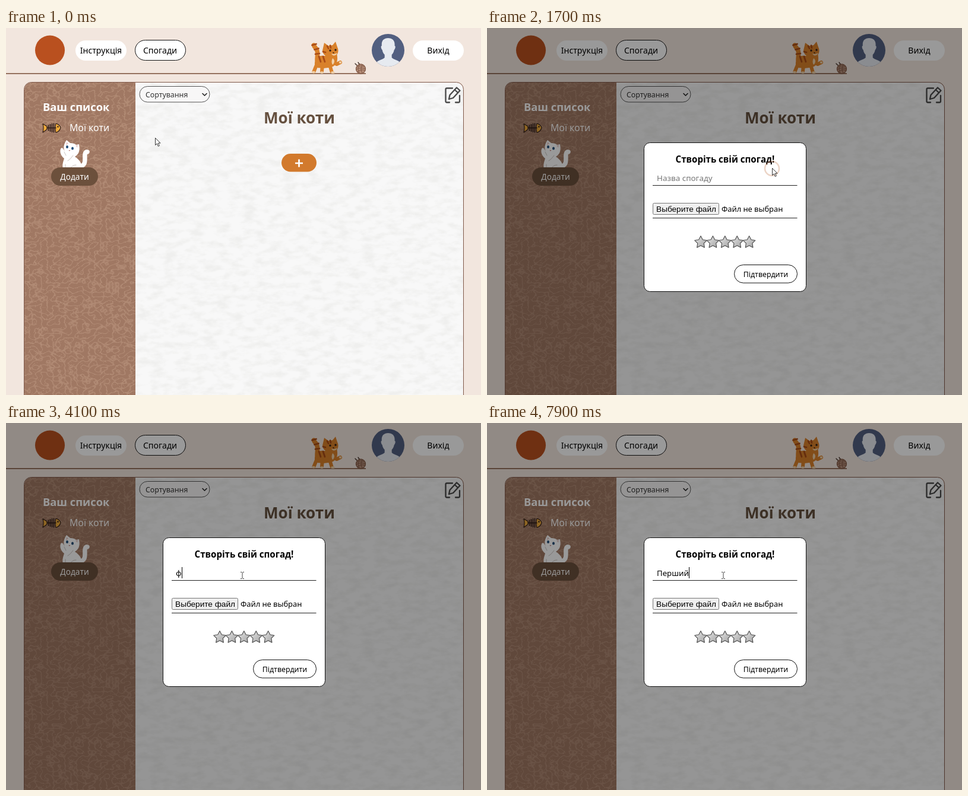
These frames come from a looping animation (800x619 px, 8000 ms). An HTML page:

```html
<!DOCTYPE html>
<html lang="uk">
<head>
<meta charset="utf-8">
<title>Мої коти</title>
<style>
html, body { margin: 0; width: 100%; height: 100%; overflow: hidden; background: #f2e6de; }
svg { position: absolute; left: 0; top: 0; width: 800px; height: 619px; }
#live { will-change: transform; }
text { font-family: "Noto Sans", "Open Sans", sans-serif; fill: #000; }
.mid { text-anchor: middle; }
.bold { font-weight: 700; }
.line { fill: none; stroke-linecap: round; stroke-linejoin: round; }
</style>
</head>
<body>
<svg id="scene" viewBox="0 0 800 619">
  <defs>
    <filter id="leather" x="0" y="0" width="1" height="1" color-interpolation-filters="sRGB">
      <feTurbulence type="turbulence" baseFrequency=".1 .13" numOctaves="1" seed="4"/>
      <feColorMatrix values="0 0 0 0 .8  0 0 0 0 .66  0 0 0 0 .57  -6 0 0 0 .8"/>
    </filter>
    <filter id="paper" x="0" y="0" width="1" height="1" color-interpolation-filters="sRGB">
      <feTurbulence type="fractalNoise" baseFrequency=".045 .1" numOctaves="3" seed="9"/>
      <feColorMatrix values="0 0 0 0 .91  0 0 0 0 .91  0 0 0 0 .9  3 0 0 0 -1.25"/>
    </filter>
    <clipPath id="panel"><path d="M31 630V104a12 12 0 0 1 12-12H758a12 12 0 0 1 12 12V630z"/></clipPath>
    <clipPath id="face"><circle cx="643.5" cy="37.5" r="27.5"/></clipPath>
  </defs>
  <rect width="800" height="619" fill="#f2e6de"/>

  <!-- header -->
  <rect y="76" width="606" height="1.700" fill="#87604a"/>
  <circle cx="74" cy="37.5" r="25" fill="#b9501f"/>
  <g fill="#fff">
    <rect x="117" y="21" width="86" height="34" rx="17"/>
    <rect x="217.5" y="20.5" width="85" height="34" rx="17" stroke="#111"/>
    <rect x="685" y="21" width="86" height="34" rx="17"/>
  </g>
  <g class="mid" font-size="14">
    <text x="160" y="43">Інструкція</text>
    <text x="259.5" y="43">Спогади</text>
    <text x="728" y="43">Вихід</text>
  </g>
  <g clip-path="url(#face)">
    <rect x="615" y="9" width="58" height="58" fill="#525f80"/>
    <path d="M643.5 17c8 0 12 5 11 13c2 0 1.500 5-.8 7c-.8 4-2 6-4 8v5c3 3 9 4 13 7v9h-38v-9c4-3 10-4 13-7v-5c-2-2-3.200-4-4-8c-2.300-2-2.800-7-.8-7c-1-8 3-13 10.600-13z" fill="#e6eaf0"/>
  </g>

  <!-- walking cat and yarn -->
  <g class="line" stroke="#d9812b">
    <path d="M524 54c0-8 2-11-.5-17c-1.500-4-4-4-5-8" stroke-width="7.500"/>
    <path d="M524 60l-5.500 13.500M533 62l-1 11M545 62l3.500 11.500M551 58l6 3 6-3" stroke-width="6"/>
    <path d="M517 74.500h2M531 75h2M549 75h3M562.500 58h1" stroke="#f1d2ab" stroke-width="3.500"/>
  </g>
  <path d="M520 63c-1-13 6-17 15-16h14l8-4c3 12 0 20-9 23c-9 2-26 4-28-3z" fill="#d9812b"/>
  <path d="M533 38l3-13 7 5 7-1 5-6 3 9c4 8 0 16-9 17c-9 1-15-3-16-11z" fill="#d9812b"/>
  <path d="M515.500 29l7-2M519.500 36.500l7-2M521 44l7-1M527 48l3 9M534 48l3 9M541 30.500l2 4M546 29.500l1 4M534 40l4 1" class="line" stroke="#a94b17" stroke-width="2.700"/>
  <path d="M548 43c3 2 7 1 9-1c1 4-7 7-9 1zM550 51c4 2 4 8 0 11c-2-3-2-7 0-11z" fill="#f1d2ab"/>
  <g fill="#301d14"><circle cx="546" cy="38" r="1.700"/><circle cx="555" cy="37" r="1.700"/><path d="M550 41h3l-1.500 2z"/></g>
  <g class="line" stroke="#825a47">
    <path d="M592 64l-4-4M596 62l-3-4" stroke="#3c2a22" stroke-width="1.300"/>
    <circle cx="597.5" cy="69" r="8" fill="#b58d78" stroke-width="1.300"/>
    <path d="M591 66q6-4 12-1M590 70q7-5 15-1M592 74q6-6 13-2M595 62q-4 7 0 14M600 62q-4 8 0 14" stroke-width="1"/>
  </g>

  <!-- panels -->
  <g clip-path="url(#panel)">
    <rect x="31" y="92" width="188" height="530" fill="#a07863"/>
    <rect x="31" y="92" width="188" height="530" filter="url(#leather)" opacity=".5"/>
    <rect x="218" y="92" width="553" height="530" fill="#f8f8f8"/>
    <rect x="218" y="92" width="553" height="530" filter="url(#paper)" opacity=".5"/>
  </g>
  <path d="M30.500 630V103.500a12 12 0 0 1 12-12H758.500a12 12 0 0 1 12 12V630" fill="none" stroke="#80594a"/>

  <!-- sidebar -->
  <text class="bold" x="62" y="139.5" font-size="18.300" style="fill:#fff">Ваш список</text>
  <text x="107" y="174" font-size="15.800" font-weight="500" style="fill:#fff">Мої коти</text>
  <g stroke="#2b1a15" stroke-width="1.100" class="line">
    <path d="M62 161.500l7 4.500v5l-7 5q2-7 0-14.500z" fill="#edaa3c"/>
    <path d="M84 161q7 2 8 7.500q-2 6-8 8q-2-8 0-15.500z" fill="#edaa3c"/>
    <path d="M69 168.500h15M71.500 164v9M74.500 162.500v12M77.500 161.500v14M80.500 161v15" stroke-width="1.500"/>
    <circle cx="87.500" cy="166.500" r=".8"/>
  </g>
  <path d="M120 233c17 2 12-13 13-20q1-5 4-4" class="line" stroke="#fff" stroke-width="7.500"/>
  <path d="M96 238c-2-8 1-14 2-18c-5-4-8-10-6-16c1-3 4-2 5 1l2 3c-3-5-2-12 3-19l6 5c4 0 8 1 10 3l5-1c1 6 1 11-1 15c-2 3-4 5-6 6c9 6 13 13 11 21z" fill="#fff"/>
  <path d="M98 209l3 6M113 215q-5 7-9 9M109 236q3-5 9-5M100 237v-7" class="line" stroke="#c6bdb8" stroke-width=".9"/>
  <path d="M102 192l3 3-4 3zM121 197l-4 1 3 4z" fill="#e8cdca"/>
  <g fill="#234f78"><ellipse cx="103" cy="200.500" rx="2" ry="2.600"/><ellipse cx="112" cy="203" rx="2" ry="2.600"/></g>
  <path d="M105.500 206h3l-1.800 1.700z" fill="#b9716c"/>
  <rect x="76" y="235" width="79" height="31" rx="15.500" fill="#6c503c"/>
  <text class="mid" x="115.5" y="256.300" font-size="13.600" font-weight="500" style="fill:#fff">Додати</text>

  <!-- content -->
  <rect x="225" y="98.500" width="118" height="26.500" rx="13.200" fill="#f8f7f7" stroke="#555"/>
  <text x="235" y="117" font-size="12.300" style="fill:#333">Сортування</text>
  <path d="M331 110.500l3.500 3.500 3.500-3.500" class="line" stroke="#222" stroke-width="1.600"/>
  <text class="mid bold" x="494" y="160.500" font-size="26" style="fill:#65503f">Мої коти</text>
  <g class="line" stroke="#484848" stroke-width="2.300">
    <path d="M752 101.500H742.500q-2 0-2 2V123.500q0 2 2 2H747M757 125.500H762q2 0 2-2V114"/>
    <path d="M746 120l1.500-7 11.500-12.500 5.500 5-11.500 12.500zM755.500 104l5.500 5"/>
  </g>
</svg>

<svg id="live" viewBox="0 0 800 619">
  <defs>
    <linearGradient id="steel" x2="1" y2="1">
      <stop stop-color="#eee"/><stop offset=".5" stop-color="#c4c4c4"/><stop offset="1" stop-color="#a2a2a2"/>
    </linearGradient>
  </defs>
  <g id="plus">
    <rect id="under" x="464" y="215" width="59" height="30.500" rx="15" fill="#a4541c"/>
    <rect x="464" y="212" width="59" height="30.500" rx="15.200" fill="#d27a2d"/>
    <path d="M487 228h13M493.500 221.500v13" stroke="#fff" stroke-width="2.700"/>
  </g>
  <g id="modal">
    <rect width="800" height="619" opacity=".4"/>
    <rect x="264.500" y="193.500" width="273" height="251" rx="10" fill="#fff" stroke="#111"/>
    <text class="mid bold" x="401" y="227" font-size="15.100">Створіть свій спогад!</text>
    <path d="M279 265.500H522.500M279 320.500H522.500" stroke="#222"/>
    <text id="hint" x="286" y="258" font-size="13.400" style="fill:#757575">Назва спогаду</text>
    <text id="typed" x="286" y="258" font-size="13.200"></text>
    <rect id="caret" y="243" width="1" height="19"/>
    <rect x="279.500" y="295.500" width="111" height="19" rx="2" fill="#efefef" stroke="#767676"/>
    <text class="mid" x="335.500" y="310" font-size="13.600" style="font-family:'Liberation Sans',Arial,sans-serif">Выберите файл</text>
    <text x="395" y="310" font-size="12.800">Файл не выбран</text>
    <g id="stars" fill="url(#steel)" stroke="#4a4a4a" stroke-width="1.100" stroke-linejoin="round"></g>
    <rect x="416.500" y="399.500" width="106" height="30.500" rx="15.200" fill="#fff" stroke="#111"/>
    <text class="mid" x="469.500" y="420" font-size="12.300">Підтвердити</text>
  </g>
  <g id="ring" fill="none">
    <circle id="halo" stroke="#b4521d"/>
  </g>
  <g id="cursor">
    <path id="arrow" d="M.5 .5V12.500l2.800-2.600 2 4.600 2-.9-2-4.500H9z" fill="#fff" stroke="#222" stroke-width=".9"/>
    <path id="hand" d="M-1 1.500c0-2 2.600-2 2.600 0V7l5.200 1.200c1.300.3 1.700 1.200 1.500 2.500l-1 4.500-1 2.300H0l-4.500-6c-1-1.600.6-2.600 1.800-1.500L-1 11.500z" fill="#fff" stroke="#222" stroke-width="1"/>
    <path id="beam" d="M-3-5.500h2l1 1 1-1h2M0-4.500V4.500M-3 5.500h2l1-1 1 1h2" fill="none" stroke="#444" stroke-width="1"/>
  </g>
</svg>

<script>
const $ = id => document.getElementById(id);
const show = (id, on) => $(id).style.display = on ? "" : "none";
const LOOP = 8000, STEP = 100, OPEN = 1700;

function star(cx, cy, r) {
  let d = "";
  for (let i = 0; i < 10; i++) {
    const a = i * Math.PI / 5, q = i % 2 ? r * .52 : r;
    d += (i ? "L" : "M") + (cx + q * Math.sin(a)).toFixed(1) + " " + (cy - q * Math.cos(a)).toFixed(1);
  }
  return `<path d="${d}z"/>`;
}
$("stars").innerHTML = [0, 1, 2, 3, 4].map(i => star(360 + i * 20.4, 361.5, 10.8)).join("");

// time, x, y
const route = [[200, 251, 185], [1300, 480, 236], [2000, 480, 236], [2900, 398, 257]];
function place(t) {
  let a = route[0];
  for (const b of route) {
    if (t < b[0]) {
      const p = Math.max(0, (t - a[0]) / (b[0] - a[0])), e = p * p * (3 - 2 * p);
      return [a[1] + (b[1] - a[1]) * e, a[2] + (b[2] - a[2]) * e];
    }
    a = b;
  }
  return [a[1], a[2]];
}

const last = (list, t) => list.reduce((v, [at, next]) => t >= at ? next : v, list[0][1]);
const typing = [[0, ""], [4100, "ф"], [5900, ""], [6700, "П"], [7000, "Пе"], [7200, "Пер"],
  [7400, "Перш"], [7500, "Перши"], [7700, "Перший"]];
const blink = [[0, 0], [3200, 1], [3700, 0], [4100, 1], [4700, 0], [5200, 1], [5700, 0],
  [5900, 1], [6200, 0], [6700, 1]];

function pulse(t, start, x, y) {
  const p = (t - start) / 400;
  if (p < 0 || p >= 1) return false;
  const halo = $("halo");
  halo.setAttribute("cx", x);
  halo.setAttribute("cy", y);
  halo.setAttribute("r", 5 + 14 * p);
  halo.setAttribute("stroke-width", 2.5);
  halo.setAttribute("opacity", (1 - p) ** 2);
  return true;
}

function draw(ms) {
  const t = Math.floor(ms / STEP) * STEP, [x, y] = place(t), open = t >= OPEN;
  const over = !open && x > 464 && x < 523 && y > 212 && y < 245;
  const input = open && y > 240;
  show("under", over);
  show("modal", open);
  show("hand", over);
  show("beam", input);
  show("arrow", !over && !input);
  $("cursor").setAttribute("transform", `translate(${x.toFixed(1)} ${y.toFixed(1)})`);
  show("ring", pulse(t, 1500, 480, 237) || pulse(t, 3100, 398, 257));

  const word = last(typing, t), typed = $("typed");
  typed.textContent = word;
  show("hint", !word);
  show("caret", last(blink, t));
  $("caret").setAttribute("x", Math.round(286 + (word && open ? typed.getComputedTextLength() : 0)));
}

function tick(now) {
  draw(now % LOOP);
  requestAnimationFrame(tick);
}
draw(0);
requestAnimationFrame(tick);
</script>
</body>
</html>
```
